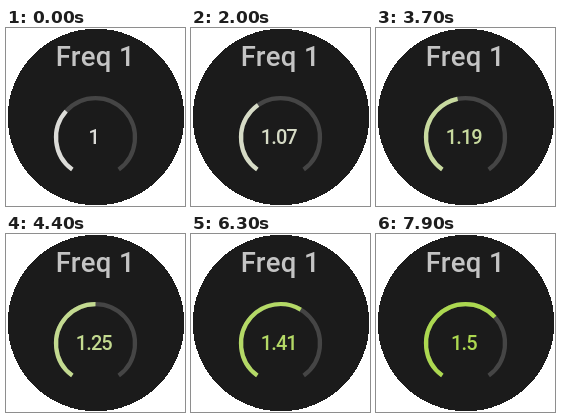
An HTML page that plays this animation: 179 px wide and 178 px high, repeating every 8000 ms.

```html
<!DOCTYPE html>
<html lang="en">
<head>
<meta charset="utf-8">
<title>Frequency dial</title>
<style>
  html, body { margin: 0; width: 100%; height: 100%; overflow: hidden; background: #fff; }
  svg { display: block; width: 179px; height: 178px; }
  text { font-family: Roboto, sans-serif; font-weight: 500; text-anchor: middle; }
  path { fill: none; stroke-width: 4.2; }
</style>
</head>
<body>
<svg viewBox="0 0 179 178">
  <circle cx="90" cy="89" r="88.3" fill="#1b1b1b" shape-rendering="crispEdges"/>
  <text x="89.4" y="37.5" font-size="27.5" letter-spacing=".4" fill="#c4c4c4">Freq 1</text>
  <path d="M66.3 141.5A39.5 39.5 0 1 1 112.7 141.5" stroke="#454545"/>
  <path id="level" d="M66.3 141.5A39.5 39.5 0 1 1 112.7 141.5" pathLength="288"/>
  <text id="readout" x="87.8" y="115.5" font-size="20" letter-spacing="-.9"></text>
</svg>
<script>
const LOOP = 8000, STEP = 100, MIN = 0.5, DEGREES_PER_UNIT = 192;
const level = document.getElementById('level');
const readout = document.getElementById('readout');

// Rests for a second, turns with slight acceleration, then slows towards 1.5.
function dialValue(time) {
  const s = time / 1000 - 1;
  if (s < 0) return 1;
  const speedUp = 1.01 + 0.0594 * s + 0.0029 * s * s;
  const slowDown = 1.5 - 0.044 * (6.9 - s);
  return Math.min(speedUp, slowDown);
}

// Grey turns green as the dial rises.
function tint(value) {
  const green = Math.max(0, (value - 1.035) / 0.465) ** 0.8;
  const mix = (from, to) => Math.round(from + (to - from) * green);
  return `rgb(${mix(220, 172)}, ${mix(220, 216)}, ${mix(216, 80)})`;
}

function draw(now) {
  const time = Math.floor(now % LOOP / STEP) * STEP;
  const exact = dialValue(time);
  const value = Math.round(exact * 100) / 100;
  const color = tint(exact);
  level.setAttribute('stroke', color);
  level.setAttribute('stroke-dasharray', `${(value - MIN) * DEGREES_PER_UNIT} 400`);
  readout.setAttribute('fill', color);
  readout.textContent = value;
}

const start = performance.now();
function tick() {
  draw(performance.now() - start);
  requestAnimationFrame(tick);
}
tick();
</script>
</body>
</html>
```
